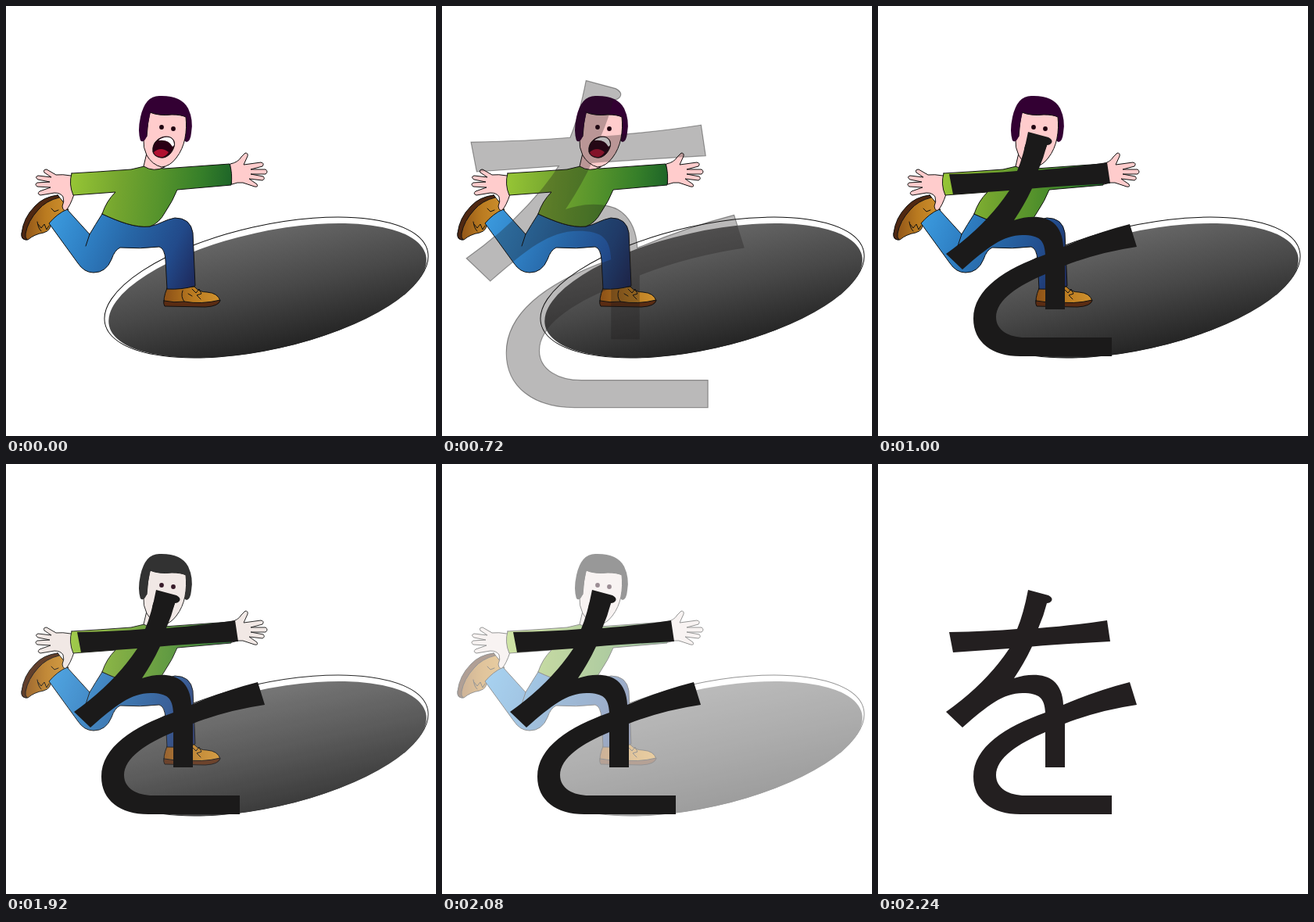
An HTML page that plays this animation: 550 px wide and 550 px high, repeating every 3.04 s.

```html
<!DOCTYPE html>
<html lang="ja">
<head>
<meta charset="utf-8">
<title>を</title>
<style>
  html, body { margin: 0; width: 100%; height: 100%; overflow: hidden; background: #fff; }
  svg { display: block; width: 100vw; height: 100vh; }
  #scene { --skin: #fcc; --hair: #303; stroke: #111; stroke-width: 1; stroke-linejoin: round; stroke-linecap: round; }
  #scene.fading { --skin: #f0e6e2; --hair: #191919; }
  .skin { fill: var(--skin); }
  .hair { fill: var(--hair); stroke: none; }
  .line { fill: none; }
  .flat { stroke: none; }
  #edge { fill: none; stroke: #111; stroke-width: .8; }
</style>
</head>
<body>
<svg viewBox="0 0 550 550">
  <defs>
    <linearGradient id="pit" gradientUnits="userSpaceOnUse" x1="0" y1="278" x2="0" y2="450">
      <stop offset="0" stop-color="#6a6a6a"/><stop offset=".5" stop-color="#484848"/><stop offset="1" stop-color="#1f1f1f"/>
    </linearGradient>
    <linearGradient id="shirt" gradientUnits="userSpaceOnUse" x1="84" y1="215" x2="289" y2="235">
      <stop offset="0" stop-color="#96c535"/><stop offset=".3" stop-color="#74a52f"/><stop offset=".55" stop-color="#57942c"/>
      <stop offset=".8" stop-color="#367f29"/><stop offset="1" stop-color="#1d6428"/>
    </linearGradient>
    <linearGradient id="jeans" gradientUnits="userSpaceOnUse" x1="62" y1="270" x2="240" y2="350">
      <stop offset="0" stop-color="#3a98dc"/><stop offset=".25" stop-color="#2f80c4"/><stop offset=".5" stop-color="#2766a6"/>
      <stop offset=".8" stop-color="#224a8a"/><stop offset="1" stop-color="#1e2c60"/>
    </linearGradient>
    <linearGradient id="shoe">
      <stop offset="0" stop-color="#8a4f17"/><stop offset=".5" stop-color="#b97a20"/><stop offset="1" stop-color="#d0922e"/>
    </linearGradient>
    <path id="kana" d="M192 161L218 168Q224 171 222 175Q220 178 216 178Q212 194 205 210Q255 206 293 200L297 227Q240 230 197 233.5Q188 253 174 274C194 267 215 269 224 277Q236 287 237 308Q279 290 322 279L331 308Q283 315 239 332V388H214V343C180 357 151 376 151 398C151 415 168 424 188 424H299V448H182C146 448 122 430 122 400C122 362 163 336 214 318C213 300 207 293 185 293C160 293 140 309 108 337L87 317Q138 281 168 236L96 241L91 215Q142 214 178 211Q186 192 192 161Z"/>
  </defs>

  <use id="edge" href="#kana"/>

  <g id="scene">
    <ellipse class="line" cx="333" cy="360" rx="211.5" ry="78.9" transform="rotate(-12.7 333 360)"/>
    <ellipse class="flat" cx="334.5" cy="364" rx="207.5" ry="75.1" transform="rotate(-12.5 334.5 364)" fill="url(#pit)"/>

    <!-- shoes -->
    <path fill="url(#shoe)" d="M66 242L72 249L80 261Q68 266 57 278Q58 287 48 290Q36 292 28 299Q19 300 20 291Q24 270 37 258Q47 245 66 242Z"/>
    <path fill="#4f2812" d="M66 242Q48 244 37 256Q22 271 20 291Q19 299 27 299Q24 296 25 291Q28 275 41 261Q51 249 68 245Z"/>
    <path class="line" d="M58 259l4 4l5-2M41 279l4 5l4-5l3 7l3-5M40 276q1 8 5 12"/>
    <path fill="url(#shoe)" d="M206 361L241 359Q247 366 257 366Q271 367 274 377Q271 384 255 384L203 383Q200 375 206 361Z"/>
    <path fill="#5a2c13" d="M202 377Q215 380 228 378Q250 382 274 376Q273 384 255 385L203 384Q201 381 202 377Z"/>
    <path class="line" d="M226 364q-3 8 2 14M238 362l5 5l4-5l3 6l-6 2l5 5M233 368l5 3"/>

    <!-- jeans -->
    <path fill="url(#jeans)" d="M123 266Q114 280 107 292L78 260Q65 266 55 278L92 329Q100 341 112 341Q128 341 135 324Q139 312 146 309Q172 311 196 308Q203 310 204 325L206 362Q226 363 242 358L239 290Q236 271 216 271C204 273 195 280 184 282C165 284 145 276 123 266Z"/>
    <path class="line" d="M107 292L102 307"/>

    <!-- hands -->
    <path class="skin" d="M83 217Q72 215 64 216L52 209Q47 209 49 213L58 219L41 217Q36 219 41 222L56 225L40 226Q36 228 40 231L57 232L43 237Q39 240 44 242L62 239Q70 239 73 244Q75 250 72 256Q73 263 77 261Q82 256 87 241Z"/>
    <path class="skin" d="M287 202Q297 200 301 193L306 188Q310 188 309 192L304 203L326 200Q331 201 328 205L313 209L332 209Q336 212 332 215L313 215L329 218Q332 221 328 223L311 221L321 228Q323 232 318 231L303 226Q296 225 289 228Z"/>

    <path fill="url(#shirt)" d="M84 214Q120 212 160 209L177 205L202 208L286 202Q290 214 288 229L219 235Q213 250 204 263Q196 278 184 282C165 284 145 276 123 266Q128 250 140 238L86 242Q80 228 84 214Z"/>

    <!-- head -->
    <path class="skin" d="M180 188L176 205Q189 213 203 206L205 198"/>
    <path class="hair" d="M172 172Q168 160 172 142Q178 115 196 115Q224 114 233 131Q240 146 237 162Q236 173 231 174L205 160Z"/>
    <path class="skin" d="M184 136Q196 141 212 139Q224 139 230 142C232 160 229 180 218 194Q210 205 199 206Q187 203 180 191Q175 181 176 170L180 167Q181 150 184 136Z"/>
    <path class="hair" d="M172 172Q169 152 178 134L185 136Q181 150 180 167Q176 176 172 172Z"/>
    <g class="flat">
      <circle cx="199" cy="155" r="2.9" fill="#200010"/>
      <circle cx="214" cy="157" r="2.9" fill="#200010"/>
    </g>
    <path fill="#2a0014" d="M188 186C186 175 196 167 205 167C214 167 217 174 215 180C212 190 204 195 198 194C192 193 188 190 188 186Z"/>
    <path class="flat" fill="#fff" d="M195 172C200 167 215 164 215 178L213 180Q208 170 195 172Z"/>
    <path class="flat" fill="#b01030" d="M189 187Q198 179 208 187Q203 194 198 193Q190 192 189 187Z"/>
  </g>

  <use id="glyph" href="#kana"/>
</svg>
<script>
  const LOOP = 3040, TICK = 40;
  const ZOOM = { at: 640, steps: 10 };
  const FADE = { at: 1920, steps: 9 };
  const CX = 209, CY = 304.5;
  const [scene, glyph, edge] = ['scene', 'glyph', 'edge'].map(id => document.getElementById(id));
  const begin = performance.now();

  // Steps completed so far; the first one lands at the phase start.
  function stepOf(phase, t) {
    const n = Math.floor((t - phase.at) / TICK) + 1;
    return Math.max(0, Math.min(phase.steps, n));
  }

  function draw(t) {
    const zoom = stepOf(ZOOM, t);
    const fade = stepOf(FADE, t);
    const scale = 1 + 0.0653 * (ZOOM.steps - zoom);
    const place = `translate(${CX} ${CY}) scale(${scale}) translate(${-CX} ${-CY})`;

    glyph.setAttribute('transform', place);
    glyph.setAttribute('fill', fade === FADE.steps ? '#231f20' : '#1b1a1a');
    glyph.setAttribute('fill-opacity', zoom / ZOOM.steps);

    // A thin outline shows while the glyph is still faint.
    edge.setAttribute('transform', place);
    edge.setAttribute('stroke-opacity', zoom ? Math.max(0, 0.8 - 0.2 * (zoom - 1)) : 0);

    scene.classList.toggle('fading', fade > 0);
    scene.style.opacity = 1 - fade / FADE.steps;
  }

  function loop() {
    draw((performance.now() - begin) % LOOP);
    requestAnimationFrame(loop);
  }
  loop();
</script>
</body>
</html>
```
